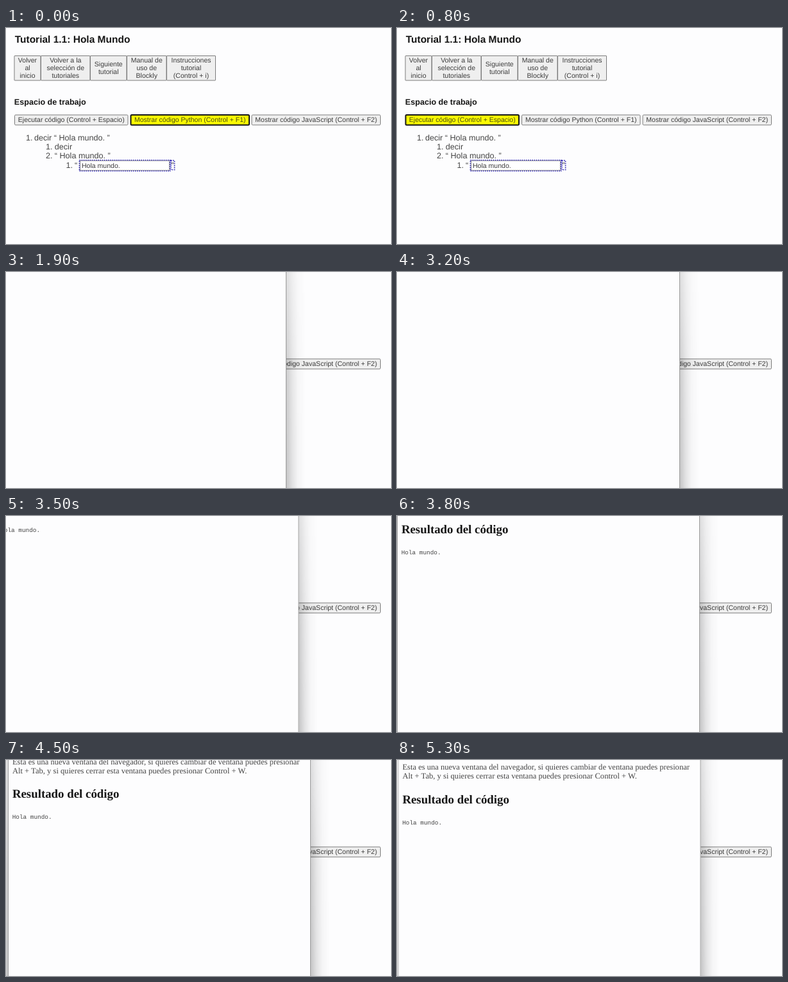
An HTML page for the animation above (8000 ms loop, 600 px wide and 338 px high).

```html
<!DOCTYPE html>
<html lang="es">
<head>
<meta charset="utf-8">
<title>Tutorial</title>
<style>
html, body { margin: 0; width: 100%; height: 100%; overflow: hidden; background: #fdfdfe; }
svg { display: block; width: 100%; height: 100%; }
text { font-family: "Liberation Sans", Arial, sans-serif; fill: #444; white-space: pre; text-rendering: geometricPrecision; }
.head { font-weight: bold; fill: #161616; }
.label { font-size: 10.54px; fill: #3c3c3c; }
.item { font-size: 12.6px; }
.button { fill: #efefef; stroke: #7c7c7c; }
.focus .button { fill: #fbfb04; stroke: #161616; stroke-width: 2; }
.focus .label { fill: #4a4a10; }
.dots { fill: none; stroke: #2a22b0; stroke-width: 1.6; stroke-dasharray: 1.6 1.6; }
.serif { font-family: "Liberation Serif", "Times New Roman", serif; }
.mono { font-family: "Liberation Mono", monospace; font-size: 9.4px; }
</style>
</head>
<body>
<svg id="stage" viewBox="0 0 600 338">
  <defs>
    <linearGradient id="shade">
      <stop offset="0" stop-opacity=".27"/>
      <stop offset=".3" stop-opacity=".13"/>
      <stop offset=".6" stop-opacity=".04"/>
      <stop offset="1" stop-opacity="0"/>
    </linearGradient>
    <linearGradient id="fade" x2="0" y2="1">
      <stop offset="0" stop-color="#fff" stop-opacity=".45"/>
      <stop offset=".5" stop-color="#fff" stop-opacity=".72"/>
      <stop offset="1" stop-color="#fff" stop-opacity=".82"/>
    </linearGradient>
    <mask id="soft" maskUnits="userSpaceOnUse" x="-40" y="0" width="560" height="338">
      <rect x="-40" width="560" height="338" fill="url(#fade)"/>
    </mask>
  </defs>
  <rect width="600" height="338" fill="#fdfdfe"/>
  <g id="page"></g>
  <g id="popup">
    <g mask="url(#soft)">
      <rect x="472" width="30" height="338" fill="url(#shade)"/>
      <rect width="30" height="338" fill="url(#shade)" transform="scale(-1 1)"/>
    </g>
    <rect x=".5" y="-10" width="471" height="360" fill="#fdfdfe" stroke="#9a9a9a"/>
    <g id="content"></g>
  </g>
</svg>
<script>
const NS = "http://www.w3.org/2000/svg";
const $ = id => document.getElementById(id);
const page = $("page"), popup = $("popup"), content = $("content");

function add(parent, tag, attrs, text) {
  const el = document.createElementNS(NS, tag);
  for (const key in attrs) el.setAttribute(key, attrs[key]);
  if (text) el.textContent = text;
  return parent.appendChild(el);
}

function write(parent, x, y, cls, text, size) {
  const el = add(parent, "text", { x, y, class: cls }, text);
  if (size) el.style.fontSize = size + "px";
  return el;
}

function button(x, y, w, h, lines, rx) {
  const g = add(page, "g", {});
  add(g, "rect", { x, y, width: w, height: h, rx, class: "button" });
  const first = y + h / 2 + 3.4 - (lines.length - 1) * 6;
  lines.forEach((line, i) =>
    write(g, x + w / 2, first + i * 12, "label", line).setAttribute("text-anchor", "middle"));
  return g;
}

write(page, 13.7, 23, "head", "Tutorial 1.1: Hola Mundo", 15.5);
[
  [13, 41, "Volver|al|inicio"],
  [54.5, 76.5, "Volver a la|selección de|tutoriales"],
  [131.5, 56.5, "Siguiente|tutorial"],
  [188.5, 61.5, "Manual de|uso de|Blockly"],
  [250.5, 76, "Instrucciones|tutorial|(Control + i)"]
].forEach(([x, w, label]) => button(x, 43.5, w, 38.5, label.split("|"), 0.5));

write(page, 12.8, 119.6, "head", "Espacio de trabajo", 12.6);
const [run, python] = [
  [13.5, 176.5, "Ejecutar código (Control + Espacio)"],
  [194.5, 184.5, "Mostrar código Python (Control + F1)"],
  [383, 200.5, "Mostrar código JavaScript (Control + F2)"]
].map(([x, w, label]) => button(x, 136, w, 15.8, [label], 1.5));

[
  [31, 44, 175.6, "1.", "decir “ Hola mundo. ”"],
  [62, 75.8, 190, "1.", "decir"],
  [62, 75.8, 204, "2.", "“ Hola mundo. ”"],
  [93.5, 107, 219.4, "1.", "“"]
].forEach(([mark, x, y, number, text]) => {
  write(page, mark, y, "item", number);
  write(page, x, y, "item", text);
});
add(page, "rect", { x: 115.5, y: 207.8, width: 139, height: 15, fill: "#fff", stroke: "#777", "stroke-width": 0.8 });
add(page, "rect", { x: 114.4, y: 206.8, width: 141.2, height: 17, class: "dots" });
write(page, 118, 219.3, "label", "Hola mundo.");
write(page, 257.5, 219.4, "item", "”");
add(page, "rect", { x: 257, y: 207.4, width: 5.6, height: 14.4, class: "dots" });

write(content, 6.9, 15.3, "serif", "Esta es una nueva ventana del navegador, si quieres cambiar de ventana puedes presionar", 12.55);
write(content, 6.9, 29.4, "serif", "Alt + Tab, y si quieres cerrar esta ventana puedes presionar Control + W.", 12.58);
write(content, 6.9, 67.9, "serif head", "Resultado del código", 18.85);
write(content, 6.7, 100.7, "mono", "Hola mundo.");

const LOOP = 8000, STEP = 100;
const FOCUS_AT = 450, OPEN_AT = 1200, OPEN_TIME = 200;

// Popup drag: time, left edge, scroll of its text
const drag = [
  [1800, -36, -118], [1900, -35, -118], [3100, -35, -118], [3200, -31, -110],
  [3800, 0, -41], [4500, 3, -8.7], [4900, 1.5, 0]
];

function dragAt(t) {
  const next = drag.findIndex(k => k[0] > t);
  if (next === 0) return drag[0].slice(1);
  if (next < 0) return drag[drag.length - 1].slice(1);
  const a = drag[next - 1], b = drag[next];
  const p = (t - a[0]) / (b[0] - a[0]);
  return [1, 2].map(i => a[i] + (b[i] - a[i]) * p);
}

function render(time) {
  const t = Math.floor((time % LOOP) / STEP) * STEP;
  run.setAttribute("class", t >= FOCUS_AT ? "focus" : "");
  python.setAttribute("class", t < FOCUS_AT ? "focus" : "");
  const [x, y] = dragAt(t);
  popup.setAttribute("opacity", Math.min(1, Math.max(0, (t - OPEN_AT) / OPEN_TIME)));
  popup.setAttribute("transform", `translate(${x} 0)`);
  content.setAttribute("transform", `translate(0 ${y})`);
}

const start = performance.now();
function tick() {
  render(performance.now() - start);
  requestAnimationFrame(tick);
}
tick();
</script>
</body>
</html>
```
